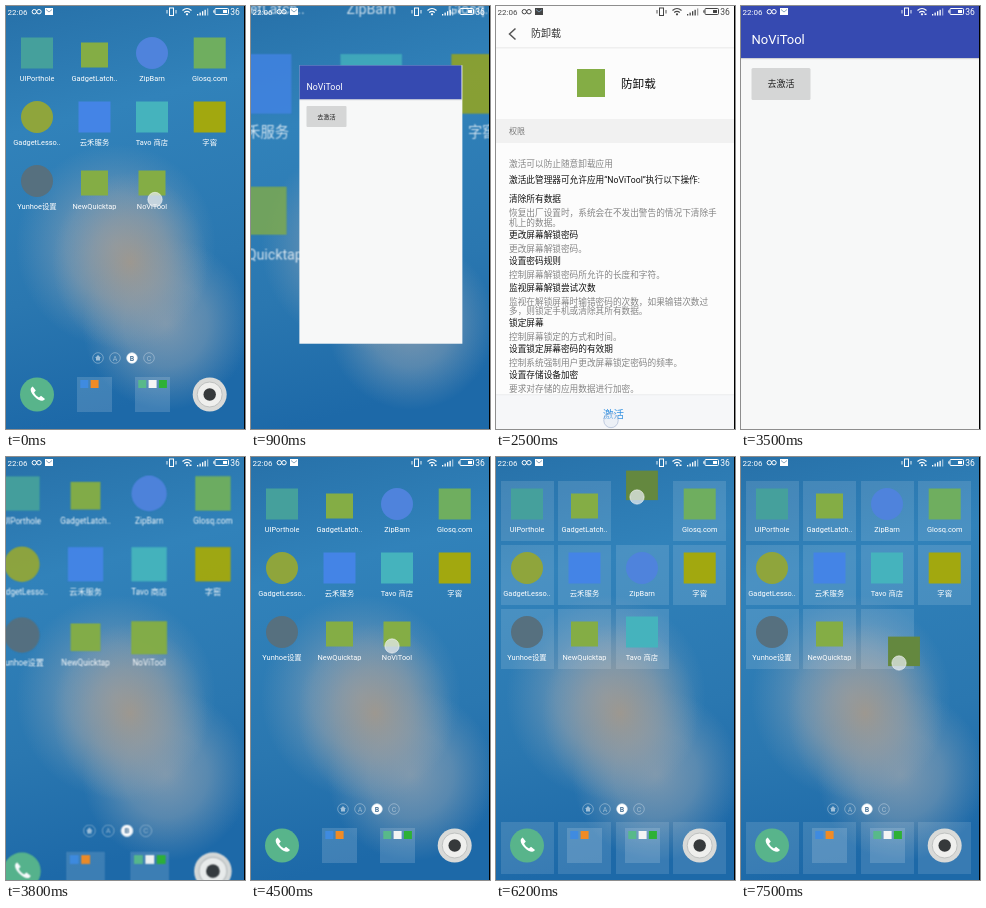
Recreate the animation shown at these times as an HTML page. Size 239 by 423 pixels, loop 7.6 s.

```html
<!DOCTYPE html>
<html lang="zh">
<head>
<meta charset="utf-8">
<style>
html, body { margin: 0; width: 100%; height: 100%; overflow: hidden; background: #2a73ad; }
svg { display: block; width: 100vw; height: 100vh; font-family: Roboto, "Noto Sans CJK SC", "Noto Sans CJK", sans-serif; }
</style>
</head>
<body>
<svg id="stage" viewBox="0 0 239 423" preserveAspectRatio="none">
  <defs>
    <linearGradient id="sky" x1="0" y1="0" x2="0.15" y2="1">
      <stop offset="0" stop-color="#2771a9"/>
      <stop offset=".3" stop-color="#3182ba"/>
      <stop offset=".7" stop-color="#2a77b0"/>
      <stop offset="1" stop-color="#1d69a8"/>
    </linearGradient>
    <radialGradient id="sand">
      <stop offset="0" stop-color="#a4988a" stop-opacity=".85"/>
      <stop offset=".5" stop-color="#9a9b9b" stop-opacity=".5"/>
      <stop offset="1" stop-color="#8a9dac" stop-opacity="0"/>
    </radialGradient>
    <radialGradient id="haze">
      <stop offset="0" stop-color="#97a4b0" stop-opacity=".75"/>
      <stop offset=".5" stop-color="#8fa3b4" stop-opacity=".5"/>
      <stop offset="1" stop-color="#7f9fb9" stop-opacity="0"/>
    </radialGradient>
  </defs>
  <rect width="239" height="423" fill="url(#sky)"/>
  <ellipse cx="110" cy="240" rx="100" ry="102" fill="url(#haze)"/>
  <ellipse cx="160" cy="318" rx="84" ry="86" fill="url(#haze)"/>
  <ellipse cx="124" cy="256" rx="78" ry="90" fill="url(#sand)"/>
  <g id="home"></g>
  <g id="app"></g>
  <g id="page"></g>
  <g id="status"></g>
  <circle id="dot" r="7.2" fill="#e6ebee" fill-opacity=".75" stroke="#fff" stroke-opacity=".5"/>
  <rect x="238" width="1" height="423"/>
</svg>
<script>
const LOOP = 7600, W = 239, H = 423;
const COLS = [31, 88.5, 146, 203.7], ROWS = [47, 111, 175];
const TILE_X = [5, 62, 120, 177];
const GREEN = '#84ad45';
const $ = id => document.getElementById(id);

function add(parent, tag, attrs, text) {
  const node = document.createElementNS('http://www.w3.org/2000/svg', tag);
  set(node, attrs);
  if (text) node.textContent = text;
  parent.appendChild(node);
  return node;
}
function set(node, attrs) {
  for (const key in attrs) node.setAttribute(key, attrs[key]);
}
const rect = (p, x, y, width, height, fill, more) => add(p, 'rect', { x, y, width, height, fill, ...more });
const circle = (p, cx, cy, r, fill, more) => add(p, 'circle', { cx, cy, r, fill, ...more });
const line = (p, d, stroke, width = 1) => add(p, 'path', { d, fill: 'none', stroke, 'stroke-width': width });
const label = (p, x, y, size, fill, text, more) => add(p, 'text', { x, y, 'font-size': size, fill, ...more }, text);
const middle = { 'text-anchor': 'middle' };

const clamp = v => Math.max(0, Math.min(1, v));
const ramp = (t, from, to) => clamp((t - from) / (to - from));
const easeOut = (u, n = 2) => 1 - (1 - u) ** n;

// Home screen
const home = $('home');
const tiles = [];
for (const y of [24, 88, 152]) {
  for (const x of TILE_X) tiles.push(rect(home, x, y, 53, 60, '#fff', { opacity: 0 }));
}
const dockTiles = TILE_X.map(x => rect(home, x, 365, 53, 52, '#fff', { opacity: 0 }));

const shapes = {
  square: (g, color) => rect(g, -16, -15.5, 32, 31, color),
  disc: (g, color) => circle(g, 0, 0, 16, color),
  small: (g, color) => rect(g, -13.5, -10.5, 27, 25, color)
};
const apps = [
  ['UIPorthole', 'square', '#45a09c'],
  ['GadgetLatch..', 'small', GREEN],
  ['ZipBarn', 'disc', '#4f83dc'],
  ['Glosq.com', 'square', '#6fae5f'],
  ['GadgetLesso..', 'disc', '#8fa53c'],
  ['云禾服务', 'square', '#4484e6'],
  ['Tavo 商店', 'square', '#45b3bd'],
  ['字窖', 'square', '#a2a80f'],
  ['Yunhoe设置', 'disc', '#56707f'],
  ['NewQuicktap', 'small', GREEN],
  ['NoViTool', 'small', GREEN]
].map(([name, shape, color], i) => {
  const x = COLS[i % 4], y = ROWS[i >> 2];
  const g = add(home, 'g', { transform: `translate(${x} ${y})` });
  const icon = add(g, 'g', {});
  const body = shapes[shape](icon, color);
  const caption = label(g, 0, 27.6, 7.4, '#fff', name, middle);
  return { x, y, g, icon, body, caption };
});
const [hub, store, dragged] = [apps[2], apps[6], apps[10]];

['', 'A', 'B', 'C'].forEach((letter, i) => {
  const x = 92 + i * 17, on = i === 2;
  circle(home, x, 352, 5.3, on ? '#fff' : 'none', { stroke: '#d5e2ec', 'stroke-width': .7, 'stroke-opacity': on ? 1 : .6 });
  if (letter) label(home, x, 354.6, 7, on ? '#4b7599' : '#c3d5e2', letter, { ...middle, 'font-weight': on ? 700 : 400, opacity: on ? 1 : .7 });
  else add(home, 'path', { d: `M${x - 3} 352l3 -3 3 3h-1v2.5h-4v-2.5z`, fill: '#d5e2ec', opacity: .7 });
});

circle(home, 31, 388.5, 17, '#58b48b');
add(home, 'path', {
  d: 'M25.5 381.5c-2 2 0 6 3.2 9.2s7.3 5.4 9.3 3.4l1-1.2-4-3.2-2 1.7c-2-.8-4-2.8-4.9-4.9l1.7-2-3.1-4z',
  fill: '#fff'
});
const folder = (x, colors) => {
  rect(home, x, 371, 35, 35, '#fff', { opacity: .15 });
  colors.forEach((c, i) => rect(home, x + 3.3 + i * 10.3, 374, 8, 8, c));
};
folder(71, ['#3f8be0', '#f08b25']);
folder(129, ['#58b98a', '#f4f4f4', '#2eb135']);
circle(home, 203.7, 388.5, 17, '#d9dad8');
circle(home, 203.7, 388.5, 12.5, '#efefed', { stroke: '#bfc1c0', 'stroke-width': 1 });
circle(home, 203.7, 388.5, 6.2, '#36393b');

// App window
const app = $('app');
rect(app, 0, 0, W, H, '#f7f8f8');
rect(app, 0, 0, W, 52, '#364ab1');
rect(app, 0, 52, W, 1.2, '#cfd0d4');
label(app, 10.5, 38, 13, '#fff', 'NoViTool');
rect(app, 10.5, 62, 59, 32, '#d5d6d6', { rx: 1.5 });
label(app, 40, 81.3, 9, '#222', '去激活', middle);

// Permission page
const page = $('page');
rect(page, 0, 0, W, H, '#fcfcfc');
line(page, 'M19.5 22.5l-6 5.5 6 5.5', '#555', 1.5);
label(page, 35, 31, 10, '#333', '防卸载', { 'font-weight': 500 });
rect(page, 0, 41.5, W, .8, '#e4e4e4');
rect(page, 81, 63, 28, 28, GREEN);
label(page, 125, 81.5, 11.6, '#111', '防卸载');
rect(page, 0, 113, W, 24, '#f1f1f1');
label(page, 13, 128, 8, '#777', '权限');
[
  [158, 0, '激活可以防止随意卸载应用'],
  [174, 1, '激活此管理器可允许应用“NoViTool”执行以下操作:'],
  [193, 1, '清除所有数据'],
  [207, 0, '恢复出厂设置时，系统会在不发出警告的情况下清除手'],
  [216.5, 0, '机上的数据。'],
  [229, 1, '更改屏幕解锁密码'],
  [243, 0, '更改屏幕解锁密码。'],
  [255, 1, '设置密码规则'],
  [269, 0, '控制屏幕解锁密码所允许的长度和字符。'],
  [282, 1, '监视屏幕解锁尝试次数'],
  [296, 0, '监视在解锁屏幕时输错密码的次数，如果输错次数过'],
  [305, 0, '多，则锁定手机或清除其所有数据。'],
  [317, 1, '锁定屏幕'],
  [331, 0, '控制屏幕锁定的方式和时间。'],
  [343, 1, '设置锁定屏幕密码的有效期'],
  [357, 0, '控制系统强制用户更改屏幕锁定密码的频率。'],
  [369, 1, '设置存储设备加密'],
  [383, 0, '要求对存储的应用数据进行加密。']
].forEach(([y, strong, text]) => label(page, 13, y + 3, 8.67, strong ? '#111' : '#858585', text));
rect(page, 0, 389, W, 34, '#f6f7f9');
rect(page, 0, 388.5, W, .7, '#e3e5e8');
label(page, 117.5, 411.5, 10.5, '#2f8fe0', '激活', middle);

// Status bar, painted in currentColor
const status = $('status'), ink = 'currentColor';
label(status, 1.5, 8.5, 8, ink, '22:06');
circle(status, 28.3, 5.7, 2.2, 'none', { stroke: ink });
circle(status, 33, 5.7, 2.2, 'none', { stroke: ink });
rect(status, 39, 2, 8, 7, ink);
line(status, 'M40 3.5l3 2.5 3 -2.5', '#7d9cb5', .9);
rect(status, 163.5, 2, 4, 7.5, 'none', { stroke: ink });
line(status, 'M161 4v3.5M170 4v3.5', ink, .9);
line(status, 'M176.5 4.5q4.5 -4 9 0M178.2 6.5q2.8 -2.3 5.6 0', ink, 1.1);
circle(status, 181, 8.3, 1.1, ink);
const wifiMark = rect(status, 183.5, 7.5, 2, 1.5, ink);
for (let i = 0; i < 5; i++) rect(status, 191 + i * 2.5, 8 - i * 1.4, 1.3, 1.5 + i * 1.4, ink, { opacity: i < 4 ? 1 : .5 });
rect(status, 209, 2.5, 13.5, 6, 'none', { stroke: ink, rx: 1 });
rect(status, 207.3, 4.3, 1.2, 2.4, ink);
rect(status, 217, 4, 4, 3, ink);
label(status, 224.3, 8.7, 8.5, ink, '36');

// Time, x, y of the dragged icon
const path = [
  [4900, 146, 175], [5000, 163, 174], [5100, 193, 165], [5200, 194, 135], [5300, 188, 103],
  [5500, 186, 75], [5650, 168, 56], [5800, 150, 42], [6000, 147, 30], [6200, 146, 26],
  [6500, 146, 30], [6800, 148, 68], [7100, 155, 130], [7300, 162, 177], [7500, 163, 192]
];
function dragPoint(t) {
  if (t <= path[0][0]) return path[0].slice(1);
  for (let i = 1; i < path.length; i++) {
    const [t0, x0, y0] = path[i - 1], [t1, x1, y1] = path[i];
    if (t <= t1) {
      const u = ramp(t, t0, t1);
      return [x0 + (x1 - x0) * u, y0 + (y1 - y0) * u];
    }
  }
  return path[path.length - 1].slice(1);
}
function cellAt(t) {
  const [x, y] = dragPoint(t);
  return y < 34 ? -1 : Math.floor((y - 22) / 64) * 4 + Math.floor((x - 2) / 58);
}

function windowSize(t) {
  if (t < 600) return 0;
  if (t < 3700) return easeOut(ramp(t, 560, 1200), 1.32);
  return (1 - ramp(t, 3600, 4300)) ** 7.8;
}

function drawEdit(t) {
  const edit = ramp(t, 4600, 5000);
  const push = ramp(t, 5650, 5900) - ramp(t, 6750, 7000);
  const lifted = t >= 4800;
  const over = cellAt(t), before = cellAt(t - 200);

  tiles.forEach((tile, i) => {
    const empty = i === 11 || i === (push > .5 ? 2 : 10);
    const hover = i === over;
    const alpha = empty ? (hover || i === before ? .12 : 0) : (hover ? .3 : .12);
    set(tile, { opacity: alpha * edit });
  });
  dockTiles.forEach(tile => set(tile, { opacity: .12 * edit }));

  for (const item of [hub, store]) {
    set(item.g, { transform: `translate(${item.x} ${item.y + 64 * push})` });
  }
  const [x, y] = lifted ? dragPoint(t) : [dragged.x, dragged.y];
  const closing = t >= 3700 && t < 4300 ? 1 + .2 * clamp(windowSize(t) / .073) : 1;
  set(dragged.g, { transform: `translate(${x} ${y})` });
  set(dragged.icon, { transform: `scale(${lifted ? 1.18 : closing})` });
  set(dragged.body, { fill: lifted ? '#64883f' : GREEN });
  set(dragged.caption, { opacity: lifted ? 0 : 1 });
}

function drawWindows(t) {
  const p = windowSize(t), zoom = 1 + 1.46 * p;
  set(home, { transform: `translate(174 147) scale(${zoom}) translate(-174 -147)`, opacity: 1 - .35 * p });

  const w = 30 + 209 * p, h = 30 + 393 * p;
  const x = 146.5 - 27 * p - w / 2, y = 176 + 35.5 * p - h / 2;
  const slide = t < 1600 ? 1 : t < 2500 ? 1 - easeOut(ramp(t, 1520, 2100)) : easeOut(ramp(t, 2500, 2800));
  const shift = p === 1 ? -50 * (1 - slide) : 0;
  set(app, {
    transform: `translate(${x + shift} ${y}) scale(${w / W} ${h / H})`,
    opacity: clamp(p * 4 - .3)
  });
  set(page, { transform: `translate(${W * slide} 0)`, visibility: slide < 1 ? 'visible' : 'hidden' });
  set(status, { color: slide < .5 ? '#444' : '#fff' });
  set(wifiMark, { opacity: t < 3500 ? 0 : 1 });
}

function drawDot(t) {
  let at = null;
  if (t < 600) at = [149, 193.5];
  else if (t >= 2300 && t < 2600) at = [115, 414.5];
  else if (t >= 4500) {
    const [x, y] = dragPoint(t);
    at = [x - 5, y + 14];
  }
  const onPage = t > 2000 && t < 3000;
  set($('dot'), {
    visibility: at ? 'visible' : 'hidden',
    fill: onPage ? '#dfe6f2' : '#e6ebee',
    'fill-opacity': onPage ? .45 : .75,
    stroke: onPage ? '#8fa3c8' : '#fff'
  });
  if (at) set($('dot'), { cx: at[0], cy: at[1] });
}

function frame(now) {
  // The picture advances in steps of a tenth of a second.
  const t = Math.floor((now % LOOP) / 100) * 100;
  drawEdit(t);
  drawWindows(t);
  drawDot(t);
}

const start = performance.now();
function tick() {
  frame(performance.now() - start);
  requestAnimationFrame(tick);
}
tick();
</script>
</body>
</html>
```
